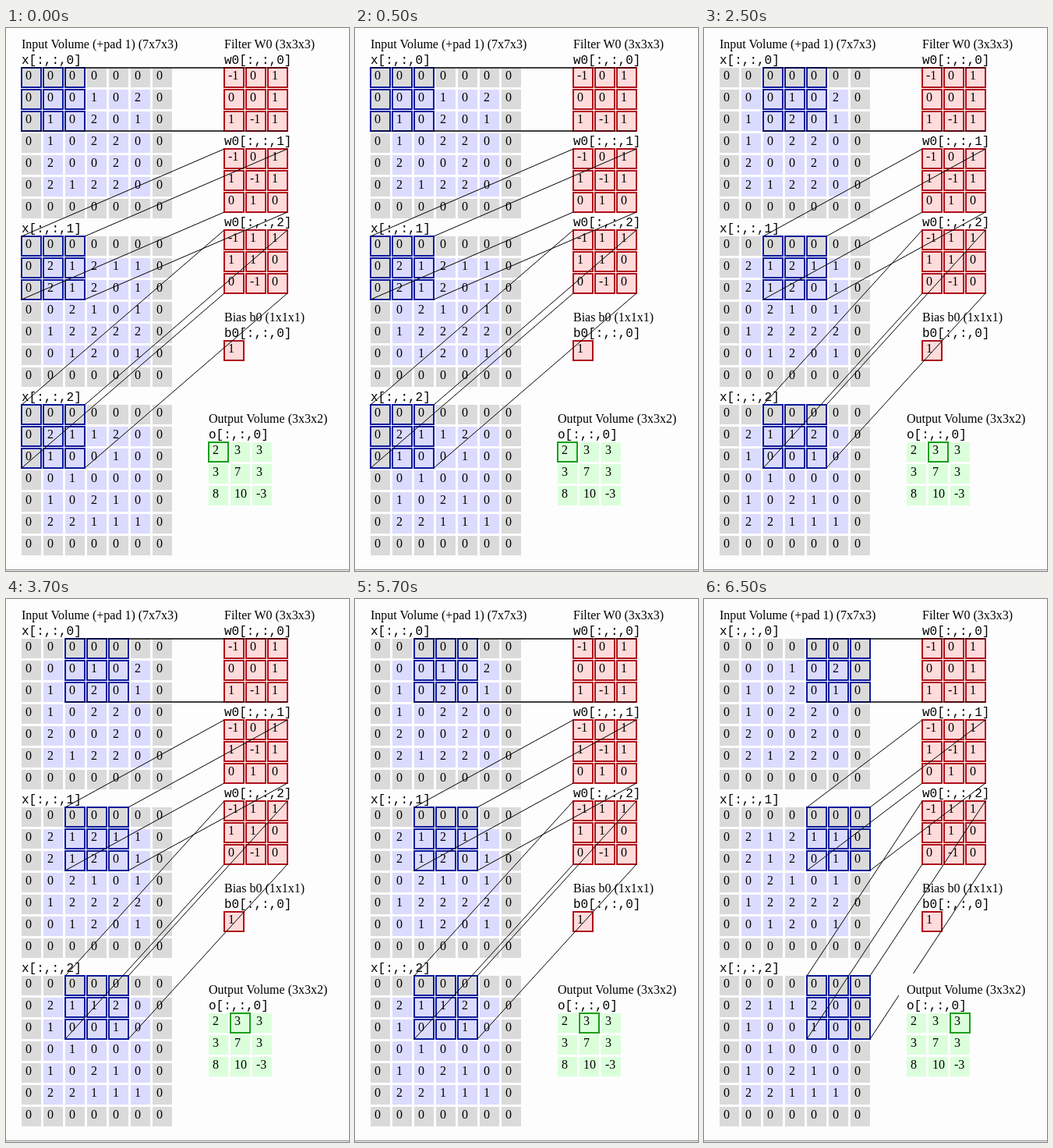
Write an HTML page that moves like this. It is 440 px wide and 696 px high and loops after 8 s.

```html
<!DOCTYPE html>
<html lang="en">
<head>
<meta charset="utf-8">
<title>Convolution demo</title>
<style>
html, body { margin: 0; height: 100%; overflow: hidden; background: #fefdfe; }
svg { display: block; font: 16px "Liberation Serif", serif; }
.code { font-family: "Liberation Mono", monospace; }
</style>
</head>
<body>
<svg id="stage" width="440" height="696"></svg>
<script>
const PITCH = 28, CELL = 25, SPAN = 2 * PITCH + CELL;
const stage = document.getElementById('stage');

const inputs = [
  '0000000 0001020 0102010 0102200 0200200 0212200 0000000',
  '0000000 0212110 0212010 0021010 0122220 0012010 0000000',
  '0000000 0211200 0100100 0010000 0102100 0221110 0000000'
].map(s => s.split(' ').map(row => [...row]));
const filters = [
  [[-1, 0, 1], [0, 0, 1], [1, -1, 1]],
  [[-1, 0, 1], [1, -1, 1], [0, 1, 0]],
  [[-1, 1, 1], [1, 1, 0], [0, -1, 0]]
];
const output = [[2, 3, 3], [3, 7, 3], [8, 10, -3]];
const inputTops = [51, 267, 483], filterTops = [51, 155, 259];

function add(tag, attrs, parent = stage) {
  const el = document.createElementNS('http://www.w3.org/2000/svg', tag);
  for (const key in attrs) el.setAttribute(key, attrs[key]);
  return parent.appendChild(el);
}

function label(x, y, text, cls = '') {
  add('text', { x, y, class: cls }).textContent = text;
}

function frame(x, y, stroke, parent) {
  return add('rect', { x, y, width: CELL, height: CELL, fill: 'none', stroke, 'stroke-width': 2 }, parent);
}

function grid(x, y, name, rows, fill, stroke) {
  label(x, y - 5, name, 'code');
  rows.forEach((row, r) => row.forEach((value, c) => {
    const cx = x + c * PITCH, cy = y + r * PITCH;
    add('rect', { x: cx, y: cy, width: CELL, height: CELL, fill: fill(r, c) });
    if (stroke) frame(cx, cy, stroke);
    label(cx + 5, cy + 15, value);
  }));
}

const inputFill = (r, c) => r % 6 && c % 6 ? '#dbdbff' : '#dbdadb';
const pink = () => '#ffdbdb', green = () => '#dbffdb';

label(20, 26, 'Input Volume (+pad 1) (7x7x3)');
label(280, 26, 'Filter W0 (3x3x3)');
label(280, 376, 'Bias b0 (1x1x1)');
inputs.forEach((rows, i) => grid(20, inputTops[i], `x[:,:,${i}]`, rows, inputFill));
filters.forEach((rows, i) => grid(280, filterTops[i], `w0[:,:,${i}]`, rows, pink, '#b0101a'));
grid(280, 401, 'b0[:,:,0]', [[1]], pink, '#b0101a');

// The window slides over the input; its corners stay tied to the filter.
const sliding = add('g', {}), links = [];
inputTops.forEach((top, i) => {
  for (let k = 0; k < 9; k++)
    frame(20 + k % 3 * PITCH, top + Math.floor(k / 3) * PITCH, '#0a1a9c', sliding);
  for (const dy of [0, SPAN])
    for (const dx of [0, SPAN]) links.push([20 + dx, top + dy, 280 + dx, filterTops[i] + dy]);
});
const lines = links.map(([, y1, x2, y2]) => add('line', { y1, x2, y2, stroke: '#000' }));

// The output panel covers the lines.
add('rect', { x: 250, y: 480, width: 190, height: 216, fill: '#fefdfe' });
label(260, 506, 'Output Volume (3x3x2)');
grid(260, 531, 'o[:,:,0]', output, green);
const result = frame(260, 531, '#18a018');
add('rect', { y: 694, width: 440, height: 1, fill: '#888' });

function draw(now) {
  const t = now % 8000, step = t < 2500 ? 0 : t < 6500 ? 1 : 2;
  const shift = step * 2 * PITCH;
  sliding.setAttribute('transform', `translate(${shift} 0)`);
  lines.forEach((line, i) => line.setAttribute('x1', links[i][0] + shift));
  result.setAttribute('x', 260 + step * PITCH);
}

const start = performance.now();
function tick() {
  draw(performance.now() - start);
  requestAnimationFrame(tick);
}
tick();
</script>
</body>
</html>
```
